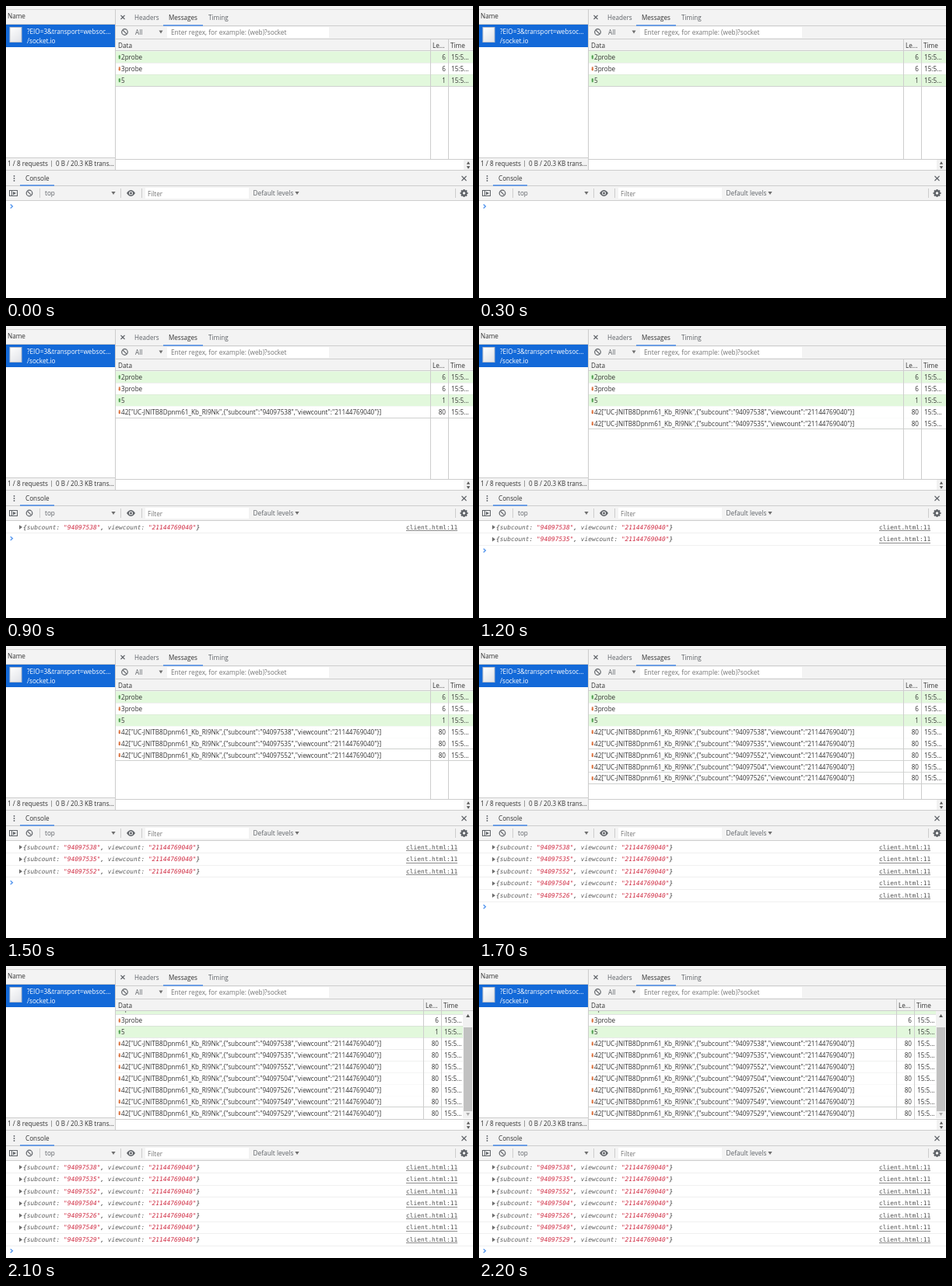
These frames come from a looping animation (600 px wide and 376 px high, 2300 ms). An HTML page with a canvas:

```html
<!DOCTYPE html>
<html lang="en">
<head>
<meta charset="utf-8">
<title>Socket messages</title>
<style>
html, body { margin: 0; width: 100%; height: 100%; overflow: hidden; background: #fff; }
canvas { display: block; width: 600px; height: 376px; }
</style>
</head>
<body>
<canvas id="stage" width="600" height="376"></canvas>
<script>
const ctx = document.getElementById('stage').getContext('2d');
const LOOP = 2300;
const UI = '"Open Sans", "Noto Sans", sans-serif';
const MONO = '"DejaVu Sans Mono", "Noto Sans Mono", monospace';
const BAR = '#f3f3f3', EDGE = '#cdcdcd', INK = '#333', ICON = '#5f6368', BLUE = '#3b82e6';
const CHANNEL = 'UC-JNITB8Dpnm61_Kb_RI9Nk';
const VIEWS = '21144769040';

// arrival time and subscriber count of each message
const updates = [
  [400, '94097538'], [1000, '94097535'], [1400, '94097552'], [1600, '94097504'],
  [1700, '94097526'], [1800, '94097549'], [2100, '94097529']
];
const handshake = [['2probe', 6, true], ['3probe', 6, false], ['5', 1, true]];

function box(x, y, w, h, color) {
  ctx.fillStyle = color;
  ctx.fillRect(x, y, w, h);
}
const hline = (x1, x2, y, color = EDGE) => box(x1, y, x2 - x1, 1, color);
const vline = (x, y1, y2, color = EDGE) => box(x, y1, 1, y2 - y1, color);

function text(str, x, y, color = INK, size = 8.2, align = 'left') {
  ctx.font = size + 'px ' + UI;
  ctx.textAlign = align;
  ctx.fillStyle = color;
  ctx.fillText(str, x, y);
}

function path(points, color, width) {
  ctx.beginPath();
  points.forEach(([x, y], i) => i ? ctx.lineTo(x, y) : ctx.moveTo(x, y));
  if (width) {
    ctx.strokeStyle = color;
    ctx.lineWidth = width;
    ctx.stroke();
  } else {
    ctx.fillStyle = color;
    ctx.fill();
  }
}

function ring(x, y, r, color, width) {
  ctx.beginPath();
  ctx.arc(x, y, r, 0, 7);
  ctx.strokeStyle = color;
  ctx.lineWidth = width;
  ctx.stroke();
}

function dot(x, y, r, color) {
  ctx.beginPath();
  ctx.arc(x, y, r, 0, 7);
  ctx.fillStyle = color;
  ctx.fill();
}

// dir 1 points down, -1 points up
function triangle(x, y, r, dir = 1, color = '#6e6e6e') {
  path([[x - r, y - r * .8 * dir], [x + r, y - r * .8 * dir], [x, y + r * .8 * dir]], color);
}

function cross(x, y, r) {
  path([[x - r, y - r], [x + r, y + r]], ICON, 1.1);
  path([[x + r, y - r], [x - r, y + r]], ICON, 1.1);
}

function clearIcon(x, y) {
  ring(x, y, 3.8, ICON, 1.2);
  path([[x - 2.6, y - 2.6], [x + 2.6, y + 2.6]], ICON, 1.2);
}

function eye(x, y) {
  ctx.beginPath();
  ctx.moveTo(x - 5.5, y);
  ctx.quadraticCurveTo(x, y - 8, x + 5.5, y);
  ctx.quadraticCurveTo(x, y + 8, x - 5.5, y);
  ctx.fillStyle = ICON;
  ctx.fill();
  dot(x, y, 2.5, BAR);
  dot(x, y, 1.5, ICON);
}

function gear(x, y) {
  for (let i = 0; i < 4; i++) {
    const a = i * Math.PI / 4, c = Math.cos(a) * 5, s = Math.sin(a) * 5;
    path([[x - c, y - s], [x + c, y + s]], ICON, 2);
  }
  dot(x, y, 3.9, ICON);
  dot(x, y, 1.7, BAR);
}

function fileIcon(x, y, w, h) {
  const shade = ctx.createLinearGradient(x, y, x + w, y + h);
  shade.addColorStop(0, '#fff');
  shade.addColorStop(1, '#dfe1e6');
  box(x, y, w, h, '#b9bfca');
  box(x + 1, y + 1, w - 2, h - 2, shade);
}

function drawRequests() {
  box(0, 5, 140, 18, BAR);
  hline(0, 600, 4, '#dadada');
  hline(0, 140, 23);
  text('Name', 2, 16.3);
  box(0, 24, 140, 29, '#1369d8');
  fileIcon(4.5, 27, 16, 20);
  text('?EIO=3&transport=websoc...', 27, 36, '#fff');
  text('/socket.io', 27, 48, '#fff');
  box(0, 195, 140, 17, BAR);
  hline(0, 140, 195);
  text('1 / 8 requests', 2, 206);
  vline(58, 199, 207, '#999');
  text('0 B / 20.3 KB trans...', 64, 206, INK, 8.05);
  vline(140, 4, 211);
}

function drawPanelTop() {
  box(141, 5, 459, 38, BAR);
  hline(141, 600, 25);
  cross(150, 14.5, 2.5);
  text('Headers', 165, 17.5, ICON, 8.1);
  text('Messages', 209, 17.5, INK, 8.1);
  text('Timing', 260, 17.5, ICON);
  box(202, 24.3, 51, 1.4, BLUE);
  clearIcon(152.5, 33.5);
  text('All', 166, 36.5, ICON);
  triangle(199, 33.5, 2.5);
  box(207, 27, 208, 14, '#fff');
  text('Enter regex, for example: (web)?socket', 212, 36.5, '#757575', 8.3);
}

function drawRow(y, label, length, sent, col) {
  box(141, y, 459, 15, sent ? '#e2f8dc' : '#fff');
  hline(141, 600, Math.round(y + 14.4), '#cfd1cf');
  const mid = y + 7.5, color = sent ? '#5aa35a' : '#dd7a4a', dir = sent ? -1 : 1;
  box(144.8, mid - 2.4, 2, 4.8, color);
  triangle(145.8, mid + 1.4 * dir, 1.5, dir, color);
  text(label, 148, y + 10.6, INK, 8.12);
  text(length, col + 20, y + 10.6, INK, 8.12, 'right');
  text('15:5...', col + 27, y + 10.6, INK, 8.1);
}

function drawMessages(count) {
  const full = count > 6;
  const col = full ? 536 : 545;
  const scroll = full ? 10.7 : 0;
  const rows = handshake.concat(updates.slice(0, count).map(([, subs]) =>
    [`42["${CHANNEL}",{"subcount":"${subs}","viewcount":"${VIEWS}"}]`, 80, false]));

  box(141, 43, 459, 168, '#fff');
  ctx.save();
  ctx.beginPath();
  ctx.rect(141, 58, 459, 138);
  ctx.clip();
  rows.forEach(([label, length, sent], i) =>
    drawRow(58.4 + i * 14.92 - scroll, label, length, sent, col));
  ctx.restore();

  box(141, 43, 459, 15, BAR);
  hline(141, 600, 42);
  hline(141, 600, 57);
  text('Data', 144, 53.5);
  text('Le...', col + 3, 53.5);
  text('Time', col + 26, 53.5);
  vline(col, 43, 197);
  vline(col + 23, 43, 197);

  if (full) {
    box(587, 58, 13, 138, '#f1f1f1');
    box(588, 79, 11, 108, '#c1c1c1');
    triangle(593.5, 64, 2.4, -1, '#555');
    triangle(593.5, 191, 2.4, 1, '#aaa');
  }
  hline(141, 600, 197);
  box(588, 198, 12, 13, '#f1f1f1');
  triangle(594, 202, 2.2, -1, '#555');
  triangle(594, 208, 2.2, 1, '#555');
}

function drawConsoleBars() {
  box(0, 212, 600, 39, BAR);
  hline(0, 600, 211);
  hline(0, 600, 231);
  hline(0, 600, 250);
  for (let i = -1; i < 2; i++) dot(10.5, 222 + i * 3, .9, ICON);
  text('Console', 25, 225);
  box(18, 230.3, 44, 1.4, BLUE);
  cross(588.5, 222, 3);

  ctx.strokeStyle = ICON;
  ctx.lineWidth = 1;
  ctx.strokeRect(4.5, 237.5, 10, 7);
  vline(7, 237, 245, ICON);
  path([[9, 239], [13, 241], [9, 243.5]], ICON);
  clearIcon(30, 241);
  [43, 147, 174, 577].forEach(x => vline(x, 235, 247));
  text('top', 50, 244, ICON);
  triangle(138, 241, 2.6);
  eye(160.5, 241);
  box(179, 234, 133, 14, '#fff');
  text('Filter', 182, 244.5, '#757575', 8.1);
  text('Default levels', 317.5, 244, ICON, 8.3);
  triangle(374, 241, 2.6);
  gear(588.5, 241);
}

// draws coloured pieces one after another
function mono(parts, x, y, style) {
  ctx.font = style + ' 7.87px ' + MONO;
  ctx.textAlign = 'left';
  for (const [str, color] of parts) {
    ctx.fillStyle = color;
    ctx.fillText(str, x, y);
    x += ctx.measureText(str).width;
  }
}

function drawLogs(count) {
  const key = '#5c5c5c', value = '#cf2b42';
  box(0, 251, 600, 125, '#fff');
  updates.slice(0, count).forEach(([, subs], i) => {
    const y = 259 + i * 15.55;
    path([[17, y - 2.7], [17, y + 2.9], [21, y + .1]], '#6e6e6e');
    mono([
      ['{', INK], ['subcount: ', key], [`"${subs}"`, value],
      [', ', INK], ['viewcount: ', key], [`"${VIEWS}"`, value], ['}', INK]
    ], 22, y + 2.6, 'italic');
    mono([['client.html:11', '#545454']], 514, y + 2.6, 'normal');
    box(514, Math.round(y + 4), 66, 1, '#8a8a8a');
    hline(0, 600, Math.round(y + 7.3), '#f0f0f0');
  });
  const py = 258 + count * 15.55;
  path([[5.7, py - 2.4], [8.4, py], [5.7, py + 2.4]], '#4f93ee', 1.3);
}

function draw(now) {
  const t = now % LOOP;
  const count = updates.filter(([at]) => at <= t).length;
  box(0, 0, 600, 376, '#fff');
  box(0, 0, 600, 4, BAR);
  drawPanelTop();
  drawMessages(count);
  drawRequests();
  drawConsoleBars();
  drawLogs(count);
}

const start = performance.now();
function tick() {
  draw(performance.now() - start);
  requestAnimationFrame(tick);
}
tick();
</script>
</body>
</html>
```
